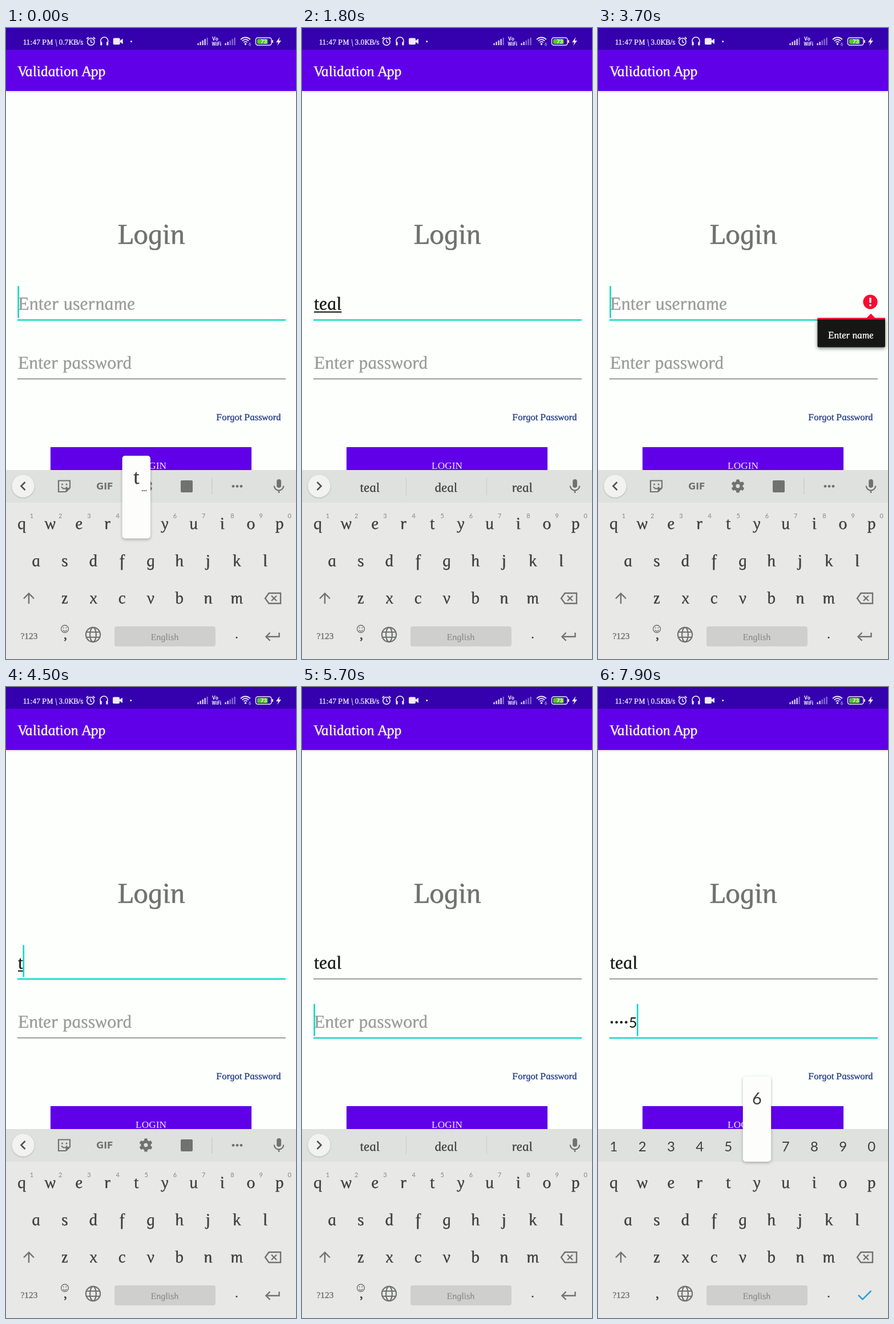
An HTML page with a canvas that plays this animation: 508 by 1102 pixels, repeating every 8 s.

```html
<!DOCTYPE html>
<html lang="en">
<head>
<meta charset="utf-8">
<title>Validation App</title>
<style>
html, body { margin: 0; width: 100%; height: 100%; overflow: hidden; background: #fdfffd; }
canvas { display: block; width: 508px; height: 1102px; }
</style>
</head>
<body>
<canvas id="stage"></canvas>
<script>
const W = 508, H = 1102, LOOP = 8000;
const canvas = document.getElementById('stage');
const g = canvas.getContext('2d');
const dpr = window.devicePixelRatio || 1;
canvas.width = W * dpr;
canvas.height = H * dpr;

const SCRIPT = '"Liberation Serif", serif';
const SANS = 'Lato, sans-serif';
const UPRIGHT = 0.17; // shear that takes most of the slant out of the italic
const PURPLE = '#6000e9', TEAL = '#10d8c6', ICON = '#707270', INK = '#3d3f3d';

// Each track is a list of [start time, value].
const name = [[0, ''], [600, 't'], [800, 'te'], [1100, 'tea'], [1300, 'teal'],
  [3000, 'tea'], [3100, 'te'], [3200, 't'], [3300, ''],
  [4400, 't'], [4700, 'te'], [4900, 'tea'], [5200, 'teal']];
const pass = [[0, ''], [6200, '1'], [6500, '12'], [7000, '123'], [7300, '1234'], [7600, '12345']];
const popup = [[0, 't'], [600, ''], [700, 'e'], [900, ''], [1000, 'a'], [1100, ''], [1200, 't'],
  [1400, ''], [4300, 't'], [4500, ''], [4600, 'e'], [4800, ''], [5100, 't'], [5300, ''],
  [6100, '1'], [6300, ''], [6400, '2'], [6600, ''], [7800, '6']];
const bar = [[0, 'tools'], [1000, 'words'], [3300, 'tools'], [4700, 'words'], [5800, 'digits']];
const pressed = [[0, ''], [2800, 'delete'], [3300, ''], [5500, 'enter'], [5700, '']];
const speed = [[0, '0.7'], [1500, '3.0'], [5500, '0.5']];
const error = [[0, false], [3600, true], [4400, false]];
const focus = [[0, 'name'], [5700, 'pass']];
const check = [[0, false], [6000, true]];
const guesses = {
  '': ['', '', ''], t: ['t', 'to', 'the'], te: ['te', 'ye', 'the'],
  tea: ['tea', 'sea', 'teal'], teal: ['teal', 'deal', 'real']
};

const entry = (track, t) => track.reduce((a, b) => b[0] <= t ? b : a);
const at = (track, t) => entry(track, t)[1];

function text(s, x, y, size, color, o = {}) {
  const style = o.style ?? 'italic';
  g.save();
  g.font = `${style} ${size}px ${o.font || SCRIPT}`;
  g.textAlign = o.align || 'center';
  g.fillStyle = g.strokeStyle = color;
  g.translate(x, y);
  if (style === 'italic') g.transform(1, 0, UPRIGHT, 1, UPRIGHT * size * 0.22, 0);
  g.fillText(s, 0, 0);
  if (o.bold) {
    g.lineWidth = o.bold;
    g.lineJoin = 'round';
    g.strokeText(s, 0, 0);
  }
  const w = g.measureText(s).width;
  g.restore();
  return w;
}
const digit = (s, x, y, size, color, align) =>
  text(s, x, y, size, color, { style: '', font: SANS, align });

function rect(x, y, w, h, color) {
  g.fillStyle = color;
  g.fillRect(x, y, w, h);
}
function box(x, y, w, h, r, color) {
  g.fillStyle = color;
  g.beginPath();
  g.roundRect(x, y, w, h, r);
  g.fill();
}
function frame(x, y, w, h, r, color, lw) {
  g.strokeStyle = color;
  g.lineWidth = lw;
  g.beginPath();
  g.roundRect(x, y, w, h, r);
  g.stroke();
}
function disc(x, y, r, color) {
  g.fillStyle = color;
  g.beginPath();
  g.arc(x, y, r, 0, 7);
  g.fill();
}
function arc(x, y, r, a, b, color, lw) {
  g.strokeStyle = color;
  g.lineWidth = lw;
  g.beginPath();
  g.arc(x, y, r, a * Math.PI, b * Math.PI);
  g.stroke();
}
function trace(pts) {
  g.beginPath();
  for (let i = 0; i < pts.length; i += 2) g.lineTo(pts[i], pts[i + 1]);
}
function line(color, lw, ...pts) {
  g.strokeStyle = color;
  g.lineWidth = lw;
  g.lineJoin = 'miter';
  trace(pts);
  g.stroke();
}
function poly(color, ...pts) {
  g.fillStyle = color;
  trace(pts);
  g.fill();
}
function shadowed(blur, dy, alpha, draw) {
  g.save();
  g.shadowColor = `rgba(0,0,0,${alpha})`;
  g.shadowBlur = blur * dpr;
  g.shadowOffsetY = dy * dpr;
  draw();
  g.restore();
}

function signal(x, strong) {
  for (let i = 0; i < 5; i++) {
    const h = 3.5 + i * 2.4;
    rect(x + i * 4, 30 - h, 2.2, h, i < strong ? '#e6deff' : '#8a6fd2');
  }
}

function statusBar(t) {
  const pale = '#f0ebff';
  rect(0, 0, W, 38, '#3500ae');
  const kbps = at(speed, t);
  text(`11:47 PM | ${kbps}KB/s`, 30, 29, 13.3, pale, { align: 'left', bold: 0.3 });
  g.save();
  if (kbps === '0.7') g.translate(0.7, 0);
  arc(148, 24, 6.2, 0, 2, pale, 1.6);
  line(pale, 1.4, 148, 20, 148, 24.5, 151, 25.5);
  line(pale, 1.8, 140.5, 19, 144, 16);
  line(pale, 1.8, 152, 16, 155.5, 19);
  arc(171.5, 22.5, 6.5, 0.85, 2.15, pale, 1.6);
  box(164.5, 24, 3.2, 6.5, 1.5, pale);
  box(175.3, 24, 3.2, 6.5, 1.5, pale);
  box(187, 17.5, 12, 11.5, 2, pale);
  poly(pale, 199, 22, 204, 18.5, 204, 28, 199, 24.5);
  disc(218.7, 23.5, 1.5, pale);
  g.restore();

  signal(335.5, 4);
  const tiny = { style: 'bold', font: 'Roboto, sans-serif', align: 'left' };
  text('Vo', 361, 22, 9, pale, tiny);
  text('WiFi', 360.5, 31, 8.5, pale, tiny);
  signal(383.5, 2);
  for (const r of [4.2, 7.8, 11.5]) arc(419.5, 28, r, 1.24, 1.76, pale, 1.8);
  disc(419.5, 28, 1.8, pale);
  digit('6', 425, 31, 7, pale, 'left');
  frame(437.5, 17, 27.5, 13, 3.5, pale, 1.5);
  box(440, 19.3, 18.5, 8.4, 1.5, '#54c91f');
  box(466, 21, 2, 5, 1, pale);
  text('73', 451.5, 27.2, 9.5, '#fff', { style: 'bold', font: SANS });
  poly(pale, 479.5, 16, 473, 25, 477, 25, 475, 31, 482, 22, 478, 22);
}

function field(y, focused) {
  if (focused) rect(20, y + 58.7, 470, 2.5, TEAL);
  else rect(20, y + 59, 470, 1.5, '#7f817f');
}

function caret(x, y, since) {
  if (since % 1000 < 500) rect(x, y, 2.6, 56, TEAL);
}

function form(t) {
  rect(0, 38, W, H - 38, '#fdfffd');
  shadowed(4, 1, 0.2, () => rect(0, 38, W, 72, PURPLE));
  text('Validation App', 21, 84, 25.7, '#fff', { align: 'left', bold: 0.4 });
  text('Login', 254.5, 377, 50.5, '#707270', { bold: 0.6 });

  const onName = at(focus, t) === 'name';
  const hint = { align: 'left', bold: 0.35 };
  const user = at(name, t), code = at(pass, t);
  field(450, onName);
  const w = text(user || 'Enter username', 21, 492, 32.3, user ? '#151715' : '#9a9c9a', hint);
  if (user && onName) rect(21, 495, w, 2, '#151715');
  if (onName) caret(user ? 20.5 + w : 20.3, 450.5, t - entry(name, t)[0]);

  field(553, !onName);
  if (!code) text('Enter password', 21, 595, 31.8, '#9a9c9a', hint);
  let x = 20.3;
  for (let i = 1; i < code.length; i++, x += 8.4) disc(x + 3.8, 585.5, 2.3, '#151715');
  if (code) x += digit(code.at(-1), x, 595, 25, '#151715', 'left') - 0.5;
  if (!onName) caret(x, 553.5, t - Math.max(5700, entry(pass, t)[0]));

  text('Forgot Password', 481.5, 685, 16.4, '#1b3580', { align: 'right', bold: 0.3 });
  shadowed(2, 0, 0.12, () => rect(78, 732, 352, 48, PURPLE));
  text('LOGIN', 254, 770, 17.3, '#f3eaff', { style: '' });
  if (at(error, t)) drawError();
}

function drawError() {
  const red = '#fb0a30';
  disc(477, 478.3, 12.6, red);
  box(475.3, 471, 3.4, 9, 1, '#fff');
  box(475.3, 482.5, 3.4, 3.4, 1, '#fff');
  shadowed(6, 2, 0.5, () => box(384.5, 507, 118.5, 50.5, 2, '#161714'));
  rect(384.5, 506.3, 118.5, 2.8, red);
  poly(red, 470, 507, 478, 498.8, 486, 507);
  text('Enter name', 443, 542, 17.2, '#fff', { bold: 0.3 });
}

function mic() {
  box(474.2, 788, 7.8, 15, 3.9, ICON);
  arc(478, 799.5, 8.2, 0, 1, ICON, 2.2);
  line(ICON, 2.4, 478, 807, 478, 812);
}

function toggle(dir) {
  shadowed(3, 1, 0.2, () => disc(30, 800, 19.7, '#f2f3f1'));
  line('#505250', 2.6, 30 - 3.5 * dir, 793, 30 + 3.5 * dir, 800, 30 - 3.5 * dir, 807);
}

function toolIcons() {
  toggle(-1);
  line(ICON, 2.2, 105, 810, 92, 810, 92, 790.5, 112, 790.5, 112, 803, 105, 810);
  poly(ICON, 104.5, 810, 104.5, 803, 112, 803);
  disc(98.5, 797, 1.5, ICON);
  disc(106, 797, 1.5, ICON);
  arc(102, 799.5, 5, 0.1, 0.9, ICON, 2);
  text('GIF', 173, 806, 15.6, ICON, { style: 'bold', font: '"DejaVu Sans", sans-serif' });
  for (let i = 0; i < 6; i++) {
    g.save();
    g.translate(245, 800);
    g.rotate(i * Math.PI / 3);
    box(-2.8, -11.5, 5.6, 8, 1, ICON);
    g.restore();
  }
  arc(245, 800, 6.2, 0, 2, ICON, 5);
  box(306, 790, 21, 21, 2, ICON);
  rect(360.5, 786, 1, 29, '#c4c6c3');
  for (const x of [398, 405, 412]) disc(x, 800.3, 2.4, ICON);
  mic();
}

function wordBar(words) {
  toggle(1);
  words.forEach((s, i) => text(s, 119 + i * 133.5, 810, 23, INK, { bold: 0.3 }));
  rect(182, 785, 1, 31, '#c8cac7');
  rect(323, 785, 1, 31, '#c8cac7');
  mic();
}

const col = i => 27.5 + i * 50.2;
const rows = [['qwertyuiop', 27.5, 875], ['asdfghjkl', 52.7, 940], ['zxcvbnm', 103, 1005]];

function keyboard(t) {
  const mode = at(bar, t), down = at(pressed, t);
  rect(0, 772, W, 330, '#e8e9e6');
  rect(0, 772, W, 57, '#dfe1de');
  if (mode === 'tools') toolIcons();
  else if (mode === 'words') wordBar(guesses[at(name, t)]);
  for (let i = 0; i < 10; i++) {
    const n = String((i + 1) % 10);
    if (mode === 'digits') digit(n, col(i), 811, 24, INK);
    else digit(n, col(i) + 17.5, 856, 11, '#858785');
  }
  for (const [keys, x, y] of rows)
    [...keys].forEach((k, i) => text(k, x + i * 50.2, y, 29.5, INK, { bold: 0.35 }));

  if (down === 'delete') box(432, 970, 70, 52, 5, '#c4c6c3');
  if (down === 'enter') box(432, 1036, 68, 36, 5, '#c4c6c3');
  line(ICON, 2.4, 40, 1005.5, 40, 988);
  line(ICON, 2.4, 31, 996.5, 40, 987.5, 49, 996.5);
  line(ICON, 2.4, 454, 996, 460.5, 987, 481, 987, 481, 1005, 460.5, 1005, 454, 996, 460.5, 987);
  line(ICON, 2.2, 465, 991.5, 474, 1000.5);
  line(ICON, 2.2, 474, 991.5, 465, 1000.5);

  text('?123', 40.5, 1067, 15.5, '#696b69', { style: '', bold: 0.3 });
  text(',', 103, 1067, 24, INK, { bold: 0.6 });
  if (mode !== 'digits') {
    arc(103, 1049.5, 6.5, 0, 2, ICON, 1.4);
    disc(100.6, 1047.5, 1, ICON);
    disc(105.4, 1047.5, 1, ICON);
    arc(103, 1050, 3.5, 0.1, 0.9, ICON, 1.3);
  }
  arc(152.5, 1059.5, 12.6, 0, 2, ICON, 2.2);
  g.beginPath();
  g.ellipse(152.5, 1059.5, 5.4, 12.6, 0, 0, 7);
  g.stroke();
  line(ICON, 2, 141, 1055, 164, 1055);
  line(ICON, 2, 141, 1064, 164, 1064);
  box(190, 1045, 177, 35, 4, '#cfd0ce');
  text('English', 278, 1069, 16, '#8c8e8c', { bold: 0.2 });
  disc(404, 1064.5, 1.5, INK);
  if (at(check, t)) line('#2b9fe0', 2.6, 456, 1062, 463.5, 1069.5, 478.5, 1054.5);
  else {
    line(ICON, 2.4, 478.5, 1056, 478.5, 1063, 456, 1063);
    line(ICON, 2.4, 462.5, 1056, 455.5, 1063, 462.5, 1070);
  }
}

function keyPopup(k) {
  if (!k) return;
  const isDigit = k >= '0' && k <= '9';
  const [keys, x0, base] = isDigit ? ['1234567890', 27.5, 811] : rows.find(r => r[0].includes(k));
  const x = x0 + keys.indexOf(k) * 50.2;
  const top = base - (isDigit ? 131 : 128), bottom = base + (isDigit ? 18 : 16.5);
  shadowed(5, 2, 0.28, () => box(x - 24.7, top, 49.4, bottom - top, 5, '#fdfefc'));
  if (isDigit) digit(k, x, base - 82, 29, INK);
  else {
    text(k, x, base - 79, 36, INK, { bold: 0.4 });
    for (const d of [-3.2, 0, 3.2]) disc(x + 13.8 + d, base - 67, 1.1, INK);
  }
}

function draw(now) {
  const t = now % LOOP;
  g.setTransform(dpr, 0, 0, dpr, 0, 0);
  form(t);
  statusBar(t);
  keyboard(t);
  keyPopup(at(popup, t));
}

const start = performance.now();
function tick() {
  draw(performance.now() - start);
  requestAnimationFrame(tick);
}
tick();
</script>
</body>
</html>
```
